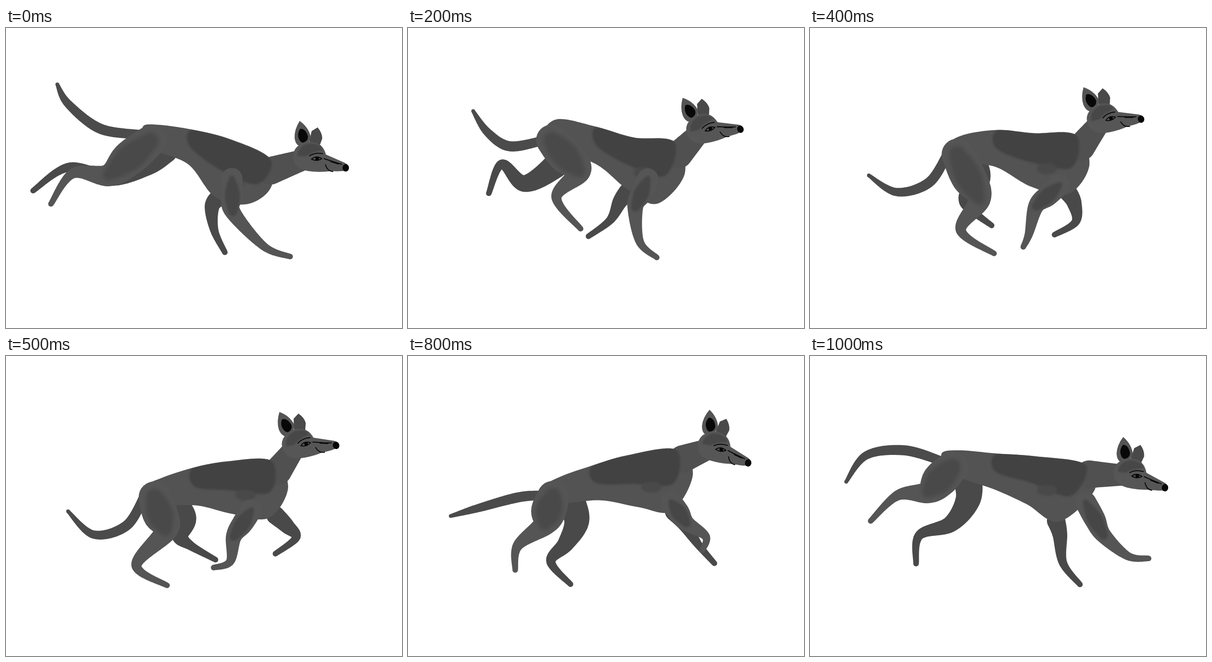
Animation of 859x652 px, one loop 1100 ms. Source, as an HTML page with a canvas:

```html
<!DOCTYPE html>
<html lang="en">
<head>
<meta charset="utf-8">
<title>Running dog</title>
<style>
html, body { margin: 0; width: 100%; height: 100%; overflow: hidden; background: #fff; }
canvas { display: block; }
</style>
</head>
<body>
<canvas id="stage" width="859" height="652"></canvas>
<script>
const ctx = document.getElementById('stage').getContext('2d');
const STEP = 100, STEPS = 11;
const BODY = '#535353', NEAR = '#555', FAR = '#494949', PATCH = '#424242', INK = '#080808';

// Half widths along each limb, the same in every pose
const WIDTHS = {
  tail: [10, 11, 9, 4], neck: [30, 22],
  nearHind: [34, 38, 24, 11, 6], farHind: [32, 27, 18, 10, 6],
  nearFore: [23, 23, 17, 9, 6], farFore: [20, 16, 9, 6],
  thighShade: [18, 28, 12], armShade: [6, 16, 9]
};

// Key joints per pose. Body: rump, hip, loin, back, withers, chest, brisket, elbow, tuck.
// Hind legs: knee, hock, paw. Fore legs: (shoulder,) elbow, wrist, paw. Head: eye x, y, degrees.
const poses = [
  { step: 0, head: [675,284,0],
    body: [296,217, 325,210, 405,221, 490,243, 574,285, 574,348, 522,383, 452,366, 395,296],
    tail: [205,219, 135,165, 111,122],
    nearHind: [222,320, 145,316, 97,383], farHind: [225,325, 135,303, 58,354],
    nearFore: [490,327, 492,400, 560,475, 617,497], farFore: [447,388, 452,440, 475,488] },
  { step: 2, head: [656,219,-17],
    body: [292,230, 325,198, 410,215, 490,238, 578,247, 600,318, 540,382, 475,350, 408,296],
    tail: [220,257, 172,226, 141,180],
    nearHind: [372,312, 322,368, 375,437], farHind: [252,338, 203,296, 175,360],
    nearFore: [520,328, 493,390, 503,465, 540,499], farFore: [460,377, 438,418, 391,453] },
  { step: 3, head: [655,202,-18],
    body: [298,225, 330,199, 410,200, 490,228, 578,237, 600,312, 550,370, 470,347, 388,278],
    tail: [255,303, 185,325, 120,303],
    nearHind: [388,365, 372,425, 450,482], farHind: [303,350, 300,378, 334,416],
    nearFore: [550,347, 486,383, 463,450, 475,492], farFore: [536,390, 523,448, 476,469] },
  { step: 5, head: [651,191,-15],
    body: [302,285, 335,266, 405,243, 480,229, 575,227, 612,285, 570,352, 490,343, 415,325],
    tail: [262,368, 190,388, 134,337],
    nearHind: [347,380, 283,455, 350,499], farHind: [377,390, 400,412, 455,443],
    nearFore: [532,335, 494,393, 486,447, 450,460], farFore: [610,370, 629,395, 584,430] },
  { step: 7, head: [654,170,-6],
    body: [302,322, 340,288, 400,254, 470,222, 570,203, 619,255, 580,337, 510,335, 430,328],
    tail: [255,381, 175,421, 100,396],
    nearHind: [330,395, 271,455, 296,501], farHind: [370,425, 358,462, 438,502],
    nearFore: [542,317, 573,359, 600,398, 553,415], farFore: [630,340, 668,358, 690,399] },
  { step: 9, head: [705,237,23],
    body: [280,253, 320,237, 400,222, 480,210, 590,202, 617,258, 565,337, 490,322, 400,299],
    tail: [220,234, 130,240, 84,300],
    nearHind: [262,338, 205,370, 169,430], farHind: [315,390, 262,432, 268,491],
    nearFore: [600,318, 636,368, 692,387, 724,430], farFore: [571,390, 590,460, 640,503] },
  { step: 10, head: [710,261,5],
    body: [285,213, 325,205, 405,212, 490,218, 597,235, 618,290, 540,360, 470,322, 400,290],
    tail: [205,205, 122,216, 78,274],
    nearHind: [255,296, 190,303, 131,359], farHind: [305,365, 237,390, 230,452],
    nearFore: [598,318, 637,390, 690,435, 735,440], farFore: [542,388, 549,450, 586,497] }
];

const lerp = (a, b, k) => a.map((v, i) => v + (b[i] - v) * k);
const shift = ([x, y], dx, dy) => [x + dx, y + dy];
const pairs = a => a.flatMap((v, i) => i % 2 ? [] : [[v, a[i + 1]]]);

// Steps without a pose of their own lie evenly between their neighbours.
function poseAt(step) {
  const i = poses.findIndex(p => p.step >= step), next = poses[i];
  if (next.step === step) return next;
  const prev = poses[i - 1], k = (step - prev.step) / (next.step - prev.step), mix = {};
  for (const part in prev) if (part !== 'step') mix[part] = lerp(prev[part], next[part], k);
  return mix;
}

function fill(path, color) {
  ctx.fillStyle = color;
  ctx.fill(path);
}

function stroke(d, width) {
  ctx.strokeStyle = INK;
  ctx.lineWidth = width;
  ctx.stroke(new Path2D(d));
}

// Smooth closed curve
function outline(points) {
  const n = points.length, path = new Path2D();
  const pt = i => points[(i + n) % n];
  path.moveTo(...pt(0));
  for (let i = 0; i < n; i++) {
    const [p, q, r, s] = [pt(i - 1), pt(i), pt(i + 1), pt(i + 2)];
    path.bezierCurveTo(q[0] + (r[0] - p[0]) / 6, q[1] + (r[1] - p[1]) / 6,
      r[0] - (s[0] - q[0]) / 6, r[1] - (s[1] - q[1]) / 6, ...r);
  }
  return path;
}

// Round brush of changing width along a smooth spine
function limb(points, part, color) {
  const spine = points.map((p, i) => [...p, WIDTHS[part][i]]), path = new Path2D();
  const at = i => spine[Math.max(0, Math.min(spine.length - 1, i))];
  for (let i = 0; i < spine.length - 1; i++) {
    const [a, b, c, d] = [at(i - 1), at(i), at(i + 1), at(i + 2)];
    for (let t = 0; t <= 1; t += 1 / 48) {
      const [x, y, r] = b.map((q, j) => {
        const p = a[j], s = c[j], u = d[j];
        return q + t / 2 * (s - p + t * (2 * p - 5 * q + 4 * s - u + t * (3 * (q - s) + u - p)));
      });
      path.moveTo(x + r, y);
      path.arc(x, y, Math.max(r, 1), 0, 7);
    }
  }
  fill(path, color);
}

function oval(x, y, rx, ry, color) {
  const path = new Path2D();
  path.ellipse(x, y, rx, ry, 0, 0, 7);
  fill(path, color);
}

function soft(blur, draw) {
  ctx.filter = `blur(${blur}px)`;
  draw();
  ctx.filter = 'none';
}

const skull = new Path2D('M-52-7Q-50-33-15-37Q12-36 19-9L60 9Q70 14 67 22Q64 29 30 27Q10 30-10 28Q-53 25-52-7Z');
const brow = new Path2D('M-43-6Q-40-30-15-33Q8-32 11-18Q-10-16-25-5Z');
const nearEar = new Path2D('M-38-82Q-50-63-49-45Q-47-28-34-26Q-18-30-14-47Q-18-68-38-82Z');
const innerEar = new Path2D('M-37-65Q-44-54-40-44Q-36-34-30-35Q-20-38-20-48Q-25-66-37-65Z');
const farEar = new Path2D('M1-68Q11-56 11-44L5-27L-18-34L-12-60Z');

function drawHead([x, y, deg]) {
  ctx.save();
  ctx.translate(x, y);
  ctx.rotate(deg * Math.PI / 180);
  ctx.lineCap = 'round';
  fill(farEar, FAR);
  fill(nearEar, '#545454');
  fill(innerEar, INK);
  fill(skull, '#565656');
  soft(1.5, () => fill(brow, '#474747'));
  stroke('M-17-6Q-5-14 12-11', 2);
  stroke('M-12 1Q-2-8 10 0Q-1 7-12 1Z', 2);
  oval(0, 0, 4, 4, INK);
  stroke('M15 0L36 7L53 12', 2);
  stroke('M30 6L46 11', 3);
  stroke('M18 13Q22 27 34 28', 2);
  oval(62, 20, 7, 8, INK);
  ctx.restore();
}

function draw(pose) {
  const trunk = pairs(pose.body);
  const [rump, rear, loin, back, withers, chest, brisket, elbow, tuck] = trunk;
  const [knee, ...shin] = pairs(pose.nearHind), [farKnee, ...farShin] = pairs(pose.farHind);
  const [shoulder, ...foreleg] = pairs(pose.nearFore), farForeleg = pairs(pose.farFore);
  const hip = shift(lerp(rump, rear, 0.6), 0, 33), farHip = lerp(hip, tuck, 0.35);
  const thigh = [hip, lerp(hip, knee, 0.5), knee];
  const farThigh = [farHip, shift(lerp(farHip, farKnee, 0.5), 20, 0), farKnee];
  const arm = [shoulder, lerp(shoulder, foreleg[0], 0.5), foreleg[0]];
  const farShoulder = lerp(farForeleg[0], lerp(back, brisket, 0.5), 0.3);
  const turn = pose.head[2] * Math.PI / 180;
  const nape = shift(pose.head, -23 * Math.cos(turn), -23 * Math.sin(turn));

  ctx.clearRect(0, 0, 859, 652);
  limb([shift(rump, 0, 15), ...pairs(pose.tail)], 'tail', '#4b4b4b');
  limb([...farThigh, ...farShin], 'farHind', FAR);
  limb([farShoulder, ...farForeleg], 'farFore', FAR);

  const body = outline([...trunk, shift(hip, 0, 15)]);
  fill(body, BODY);
  limb([lerp(withers, chest, 0.4), nape], 'neck', '#505050');
  ctx.save();
  ctx.clip(body);
  soft(2, () => {
    const under = [lerp(withers, brisket, 0.55), lerp(back, elbow, 0.55), lerp(loin, tuck, 0.5)];
    fill(outline([loin, back, withers, ...under]), PATCH);
    oval(...lerp(elbow, withers, 0.35), 22, 12, '#494949');
  });
  ctx.restore();
  drawHead(pose.head);

  limb([...thigh, ...shin], 'nearHind', NEAR);
  limb([...arm, ...foreleg.slice(1)], 'nearFore', NEAR);
  soft(4, () => limb(thigh, 'thighShade', '#494949'));
  soft(2, () => limb(arm, 'armShade', '#464646'));
}

let shown = -1;
function tick() {
  const step = Math.floor(performance.now() / STEP) % STEPS;
  if (step !== shown) draw(poseAt(shown = step));
  requestAnimationFrame(tick);
}
tick();
</script>
</body>
</html>
```
